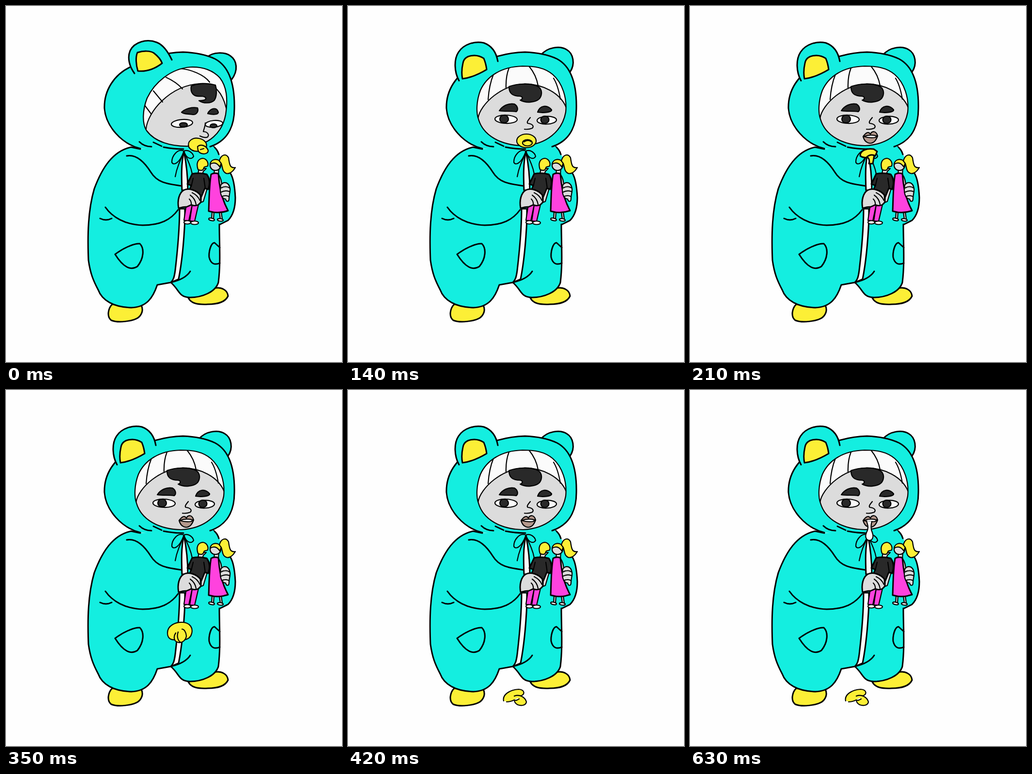
An HTML page that plays this animation: 693 px wide and 734 px high, repeating every 1.19 s.

```html
<!DOCTYPE html>
<html lang="en">
<head>
<meta charset="utf-8">
<title>Bear suit</title>
<style>
  html, body { margin: 0; width: 100%; height: 100%; overflow: hidden; background: #fefefe; }
  svg { display: block; width: 100vw; height: 100vh; }
  path, ellipse { stroke: #000; stroke-width: 3; stroke-linecap: round; stroke-linejoin: round; fill: none; }
  .cyan { fill: #14eee0; }
  .yellow { fill: #fcef36; }
  .pink { fill: #ff42de; }
  .grey { fill: #dcdcdc; }
  .dark { fill: #292929; }
  .white { fill: #fbfbfb; }
  .lip { fill: #b5998d; }
  .fine { stroke-width: 2.2; }
  .bare { stroke: none; }
</style>
</head>
<body>
<svg id="stage" viewBox="0 0 693 734"></svg>
<script>
const STEP = 70, LOOP = 1190, LAST_STEP = 9;

const path = (cls, d) => `<path class="${cls}" d="${d}"/>`;
const oval = (cls, cx, cy, rx, ry, tilt = 0) =>
  `<ellipse class="${cls}" cx="${cx}" cy="${cy}" rx="${rx}" ry="${ry}" transform="rotate(${tilt} ${cx} ${cy})"/>`;
const during = (from, to, content) => `<g data-from="${from}" data-to="${to}">${content}</g>`;

// Three head poses: looking down, halfway, facing front.
const heads = [
  {
    from: 0, to: 0,
    earBack: 'M416 105C426 95 451 94 463 103C476 112 480 133 465 152',
    ear: 'M265 139C254 124 250 106 256 92C265 74 290 67 311 75C326 81 335 96 342 111',
    earInner: 'M271 96C283 92 298 92 305 97C314 104 320 112 322 118C309 128 291 136 272 134C268 121 267 105 271 96Z',
    opening: 'M380 126C340 129 306 158 291 190C282 213 280 242 290 257C307 280 340 290 378 289C419 287 446 261 453 224C458 190 455 166 441 148C426 132 405 125 380 126Z',
    brow: 'M289 253C292 219 337 164 400 160C431 157 447 181 454 210',
    seams: 'M287 206L299 222M304 175L323 198M330 147Q352 157 364 171M357 129C381 130 409 142 420 157',
    hair: 'M382 165C379 181 389 187 400 186C409 186 413 188 412 192C409 195 404 195 398 195C406 201 423 202 430 194C435 186 435 172 432 163C414 158 396 160 382 165Z',
    brows: 'M362 219C370 211 384 208 395 210C398 217 393 224 386 224C377 222 366 224 362 219ZM416 222C420 212 434 206 438 219C438 225 425 224 416 222Z',
    eyes: [[363, 242, 22, 8, -5], [429, 243, 18, 7, -5]],
    pupils: [[366, 245, 8, 4.5], [428, 247, 7, 4]],
    nose: 'M411 241C411 248 408 254 407 259C415 259 420 265 416 270Q411 273 400 268'
  },
  {
    from: 1, to: 1,
    earBack: 'M408 103C419 89 444 87 456 96C470 106 472 129 461 143',
    ear: 'M249 147C242 125 243 101 253 88C265 74 290 71 305 78C318 85 325 97 330 110',
    earInner: 'M268 99C284 90 298 104 306 124C295 134 276 139 258 140C255 125 258 107 268 99Z',
    opening: 'M370 124C329 126 293 149 281 183C275 206 277 237 288 255C303 277 331 289 364 290C410 290 442 260 451 222C455 194 452 163 432 145C415 129 394 124 370 124Z',
    brow: 'M279 228C294 191 331 165 371 165C410 163 438 177 452 197',
    seams: 'M313 142L305 188M352 126Q356 142 354 167M389 127Q403 145 411 169M435 152L445 187',
    hair: 'M358 166C354 178 360 185 370 186C376 185 379 187 372 192C379 199 399 197 407 193C413 189 415 177 412 168C395 164 374 164 358 166Z',
    brows: 'M334 217C345 205 360 202 368 209C374 216 375 221 369 222C356 218 345 217 334 217ZM405 220C411 211 426 206 430 223C422 225 412 222 405 220Z',
    eyes: [[347, 240, 22, 8.5, 0], [419, 242, 16, 7, 0]],
    pupils: [[349, 240, 8, 7.5], [421, 242, 7, 6.5]],
    nose: 'M396 236C391 240 386 246 390 248C399 250 402 257 397 261Q391 263 384 261'
  },
  {
    from: 2, to: LAST_STEP,
    earBack: 'M398 101C411 85 437 81 451 90C465 98 469 120 458 136',
    ear: 'M229 154C219 136 218 110 228 95C239 78 262 72 280 76C297 82 306 97 309 114',
    earInner: 'M237 118C240 100 265 98 280 108C283 115 285 123 286 131C271 140 253 148 236 150C234 140 235 127 237 118Z',
    opening: 'M360 124C316 125 286 145 273 174C265 195 264 219 269 233C279 268 316 287 361 288C409 286 442 258 449 219C452 191 443 159 422 141C405 127 385 124 360 124Z',
    brow: 'M268 232C273 201 319 162 362 161C402 160 437 180 449 207',
    seams: 'M300 141Q291 163 289 193M332 128Q325 146 326 170M374 125Q388 142 392 164M424 149Q433 163 438 192',
    hair: 'M332 166C332 180 339 186 355 186C361 187 361 192 355 194C367 201 387 199 395 191C401 183 401 172 392 166C375 158 349 160 332 166Z',
    brows: 'M312 216C319 205 332 200 343 202C350 206 352 214 347 218C335 216 324 218 312 216ZM391 219C396 204 411 203 420 214C421 219 404 221 391 219Z',
    eyes: [[326, 233.5, 23, 8.5, 2], [410, 235.5, 20, 8, -2]],
    pupils: [[322, 233, 9, 8], [406, 234.5, 8.5, 7.5]],
    nose: 'M376 230C371 236 368 240 371 242C381 243 384 248 380 252Q373 255 364 254'
  }
];

// The halfway pose keeps an unlined trace of the ears' first position.
const trace = (head, ear) => head.from === 1 ? path('cyan bare', heads[0][ear]) : '';

const headBack = head => during(head.from, head.to,
  trace(head, 'earBack') + path('cyan', head.earBack));

const headFront = (head, i) => during(head.from, head.to, `
  ${trace(head, 'ear')}${path('cyan', head.ear)}${path('yellow', head.earInner)}
  <clipPath id="face${i}"><path d="${head.opening}"/></clipPath>
  ${path('white bare', head.opening)}
  <g clip-path="url(#face${i})">
    ${path('grey fine', head.brow + 'L500 320L250 320Z')}
    ${path('fine', head.seams)}
  </g>
  ${path('fine', head.opening)}
  ${path('dark fine', head.hair)}${path('dark fine', head.brows)}
  ${head.eyes.map(e => oval('white fine', ...e)).join('')}
  ${head.pupils.map(p => oval('dark fine', ...p)).join('')}
  ${path('fine', head.nose)}`);

const bodyOutline = 'M277 295L258 291C220 299 198 334 182 377C169 421 168 472 170 524C174 552 180 566 190 585C198 607 222 621 258 622C290 621 303 602 312 575L340 570C359 587 356 600 379 601C404 601 432 590 438 570C443 530 440 493 440 450';

const body =
  path('yellow', 'M219 615C211 623 207 640 217 648C231 654 261 650 272 643C280 637 284 627 279 617Z') +
  path('yellow', 'M376 602C382 613 394 616 416 615C437 615 452 611 458 598C457 586 444 578 429 582Z') +
  path('cyan bare', 'M427 289C438 296 440 309 447 322C460 338 467 352 470 372C474 394 474 415 466 432C460 442 450 446 440 450L400 440L380 290Z') +
  path('', 'M427 289Q436 295 439 306M463 345C469 355 472 374 473 395C473 416 468 432 458 442L440 451') +
  path('cyan bare', bodyOutline + 'L450 330L425 285Z') +
  path('', bodyOutline);

const hood = 'M277 294C238 284 206 248 203 211C202 174 223 141 258 125C285 110 323 96 365 95C393 96 414 101 431 109C463 126 472 166 471 212C471 252 454 279 421 290';

const suit =
  path('', 'M275 280Q285 290 300 290M304 281L321 289M325 291Q345 295 366 295') +
  path('', 'M249 309C270 305 287 324 299 343C313 366 337 367 362 371M205 415C219 435 245 451 282 452C318 452 340 441 355 420M194 438Q206 444 218 438') +
  path('', 'M225 512C239 501 263 489 276 490C286 500 284 521 271 537C257 546 242 539 225 512ZM441 498L430 488C422 489 418 507 419 518C422 531 430 535 441 530') +
  path('white', 'M367 300C361 325 362 354 363 380L375 380C375 349 372 325 367 300Z') +
  path('white', 'M358 418C358 455 353 511 349 545C347 560 345 565 340 570L356 563C363 528 367 484 369 440V418Z') +
  path('', 'M340 570Q370 563 380 547') +
  path('cyan fine', 'M367 299C354 293 342 309 342 322C345 330 358 325 367 299ZM367 299C375 295 385 302 387 310C383 317 372 316 367 299Z') +
  path('fine', 'M367 302C359 319 352 334 349 352M367 302C374 315 381 329 384 346');

const mouth =
  path('lip fine', 'M357 269C363 261 368 258 372 264C376 257 384 257 387 268C384 276 380 283 371 283C363 282 359 277 357 269Z') +
  path('white fine', 'M358 269Q372 264 386 268L382 271Q371 273 358 269Z');

const tumble = path('yellow', 'M347 366C347 354 361 350 375 352L382 357L378 366Q370 372 361 369Q354 371 347 366Z') +
  path('yellow', 'M361 368Q368 362 376 365L373 382H365Q368 373 361 368Z');

const pacifier =
  during(0, 0,
    path('yellow fine', 'M377 291C373 278 386 270 398 273C409 275 416 283 413 291C405 301 386 304 377 291Z') +
    path('yellow fine', 'M395 290C401 284 413 287 417 298C417 305 406 307 399 302C394 298 396 291 395 290ZM401 296L408 294')) +
  during(1, 1,
    path('yellow fine', 'M358 283C357 271 371 266 383 267C396 269 402 279 399 287C391 298 367 298 358 283Z') +
    path('yellow fine', 'M373 287C370 280 377 276 384 278L394 282C399 290 397 299 389 297Q377 296 373 287M387 278Q386 286 391 291')) +
  during(2, 2,
    oval('yellow fine', 368, 278, 20, 14) + oval('yellow fine', 370, 282, 10, 6.5) + path('fine', 'M363 280Q372 274 378 280')) +
  during(3, 3, `<g transform="translate(4 -57)">${tumble}</g>`) +
  during(4, 4, tumble) +
  during(5, 5,
    path('yellow fine', 'M333 501C333 486 349 478 365 479C380 480 386 491 383 502C381 511 374 514 368 515L350 515C339 516 333 511 333 501Z') +
    path('yellow fine', 'M350 501C345 508 346 518 354 520C361 523 371 517 372 507C371 498 367 493 363 493M355 499C352 507 354 517 360 520')) +
  during(6, LAST_STEP,
    path('yellow bare', 'M321 640C319 627 334 618 352 617C365 618 366 628 355 632C341 640 332 646 321 640Z') +
    path('fine', 'M321 641C318 628 334 618 352 617C365 618 366 628 355 631L343 631M327 643Q335 643 343 639') +
    path('yellow fine', 'M343 631C354 627 365 633 368 643C367 650 358 652 350 649C343 645 341 638 347 640L353 637'));

const droolShape = path('white fine', 'M364 270C367 279 369 285 364 294C360 303 364 310 370 310C377 310 379 302 376 294C372 286 373 279 375 271');
const drool = [[7, .35], [8, .65], [9, 1]].map(([step, size]) =>
  during(step, step, `<g transform="translate(0 270) scale(1 ${size}) translate(0 -270)">${droolShape}</g>`)).join('');

const man =
  path('pink fine', 'M372 409L367 442L377 443L384 410ZM384 410L379 443L389 444L398 405Z') +
  oval('white fine', 374, 446, 7, 3.5) + oval('white fine', 389, 447, 8, 3.5) +
  path('grey fine', 'M410 374L403 390L402 405L407 403L415 376Z') +
  path('grey fine', 'M398 335L396 346L405 347L407 341L413 335Z') +
  path('dark', 'M384 346Q400 343 414 347C421 356 421 366 417 378L410 376L403 393C395 388 385 382 379 378L382 370L374 367Z') +
  path('fine', 'M386 355L382 372M408 355L411 376') +
  path('yellow fine', 'M396 337C392 325 395 315 406 314C414 315 418 323 416 330L409 332L406 338Q401 340 396 337Z');

const woman =
  path('grey fine', 'M425 425L424 438L428 439L429 425ZM440 425L442 439L446 439L444 425Z') +
  oval('white fine', 424, 440, 6, 2.5, 12) + oval('white fine', 442, 441, 6, 2.5, 8) +
  path('grey fine', 'M430 337L429 347L438 347L439 335Z') +
  path('grey fine', 'M438 347Q445 357 445 371L440 374Z') +
  path('pink', 'M423 347Q430 343 438 346L440 365C443 389 450 407 458 422Q438 429 418 423C419 397 419 370 423 347Z') +
  oval('grey fine', 432, 329, 11, 10) +
  path('yellow fine', 'M421 326C423 314 439 313 444 324L441 332Q433 319 421 326Z') +
  path('yellow fine', 'M440 320C443 306 454 303 459 313C461 327 462 335 473 333C466 345 456 349 450 342C444 336 448 325 440 320Z');

const hands =
  path('grey', 'M356 417C353 401 357 386 366 380C377 374 393 380 401 390L402 404C397 412 389 413 382 410L373 414Q365 414 356 417Z') +
  path('fine', 'M384 385Q395 390 400 401M380 390Q390 397 392 409M378 398Q383 403 382 410') +
  path('grey fine', 'M443 369C450 360 460 364 462 376C463 383 460 388 460 397C460 405 454 404 453 398C444 397 440 385 443 369Z') +
  path('fine', 'M444 375Q453 370 461 375M443 384Q453 379 462 383M445 393Q453 389 460 393');

const stage = document.getElementById('stage');
stage.innerHTML = body + heads.map(headBack).join('') +
  path('cyan bare', hood + 'L350 297Z') + path('', hood) +
  heads.map(headFront).join('') + suit + during(3, LAST_STEP, mouth) +
  pacifier + drool + man + woman + hands;

const timed = [...stage.querySelectorAll('[data-from]')];
const start = performance.now();

function draw() {
  const elapsed = (performance.now() - start) % LOOP;
  const step = Math.min(LAST_STEP, Math.floor(elapsed / STEP));
  for (const part of timed) {
    const shown = step >= +part.dataset.from && step <= +part.dataset.to;
    part.style.display = shown ? '' : 'none';
  }
  requestAnimationFrame(draw);
}
draw();
</script>
</body>
</html>
```
